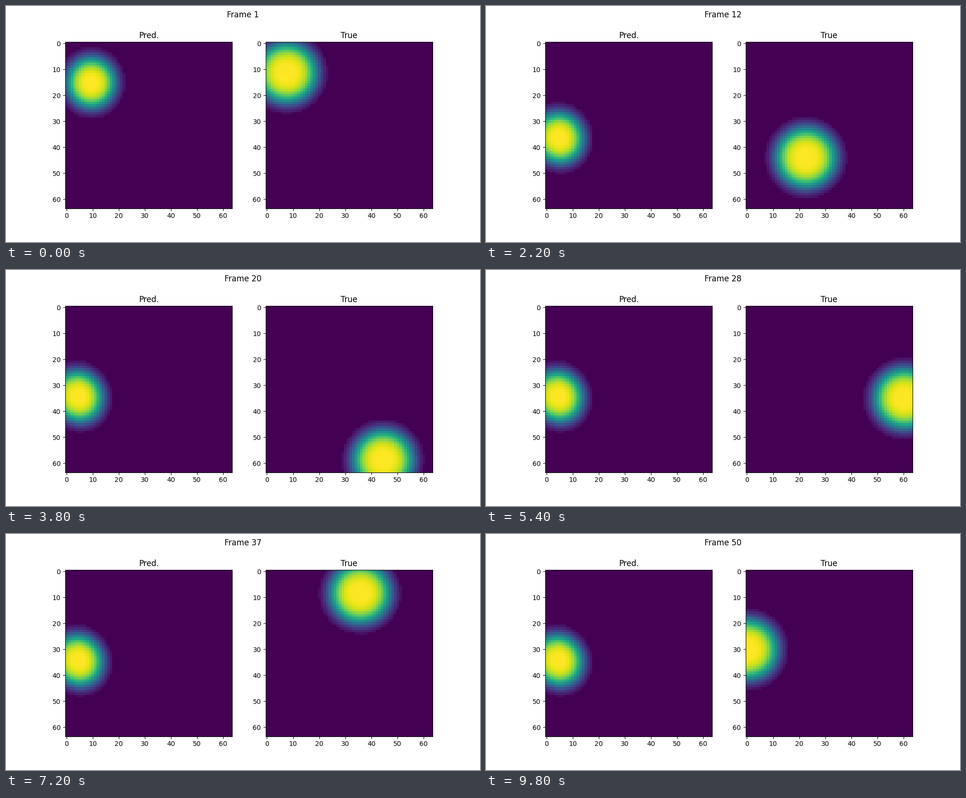
These frames come from a looping animation (1000x500 px, 10 s). A matplotlib script:

```python
import matplotlib.pyplot as plt
import numpy as np
from matplotlib.animation import FuncAnimation

SIZE = 64
FRAMES = 50
INTERVAL = 200
WALL = 63.2
FLOOR = 0.042  # fainter light than this reads as background

rows, cols = np.mgrid[:SIZE, :SIZE]

# Predicted path: follows the ball at first, then settles near the left edge
PRED_T = [0, 2, 4, 6, 8, 11, 15, 19]
PRED_X = [9.4, 6.2, 4.5, 4.3, 4.5, 4.8, 4.6, 4.5]
PRED_Y = [15.2, 24.0, 34.0, 39.7, 38.9, 36.4, 34.8, 34.3]


def bounce(pos):
    """Reflect a straight path between 0 and WALL."""
    return WALL - abs(pos % (2 * WALL) - WALL)


def blob(cx, cy, rx, ry, power, skew=0.0):
    dy = rows - cy
    dx = cols - cx - skew * dy
    dist = np.hypot(dx / rx, dy / ry)
    light = np.exp(-dist ** power)
    light[light < FLOOR] = 0
    return light / light.max()


def true_image(t):
    return blob(bounce(7.5 - 2.73 * t), bounce(11.4 + 2.96 * t),
                11.8, 11.8, 4)


def pred_image(t):
    cx = np.interp(t, PRED_T, PRED_X)
    cy = np.interp(t, PRED_T, PRED_Y)
    skew = 0.06 * min(t / 19, 1)
    return blob(cx, cy, 9.5, 10.0, 3.6, skew)


plt.rcParams["font.family"] = "DejaVu Sans"
fig, axes = plt.subplots(1, 2, figsize=(10, 5), dpi=100)
heading = fig.suptitle("Frame 1")
views = []
for ax, name, image in zip(axes, ("Pred.", "True"), (pred_image, true_image)):
    ax.set_title(name)
    views.append((ax.imshow(image(0), cmap="viridis", vmin=0, vmax=1), image))


def update(t):
    heading.set_text(f"Frame {t + 1}")
    for view, image in views:
        view.set_data(image(t))
    return [heading] + [view for view, _ in views]


anim = FuncAnimation(fig, update, frames=FRAMES, interval=INTERVAL,
                     repeat=True, repeat_delay=0, blit=False)
plt.show()
```
